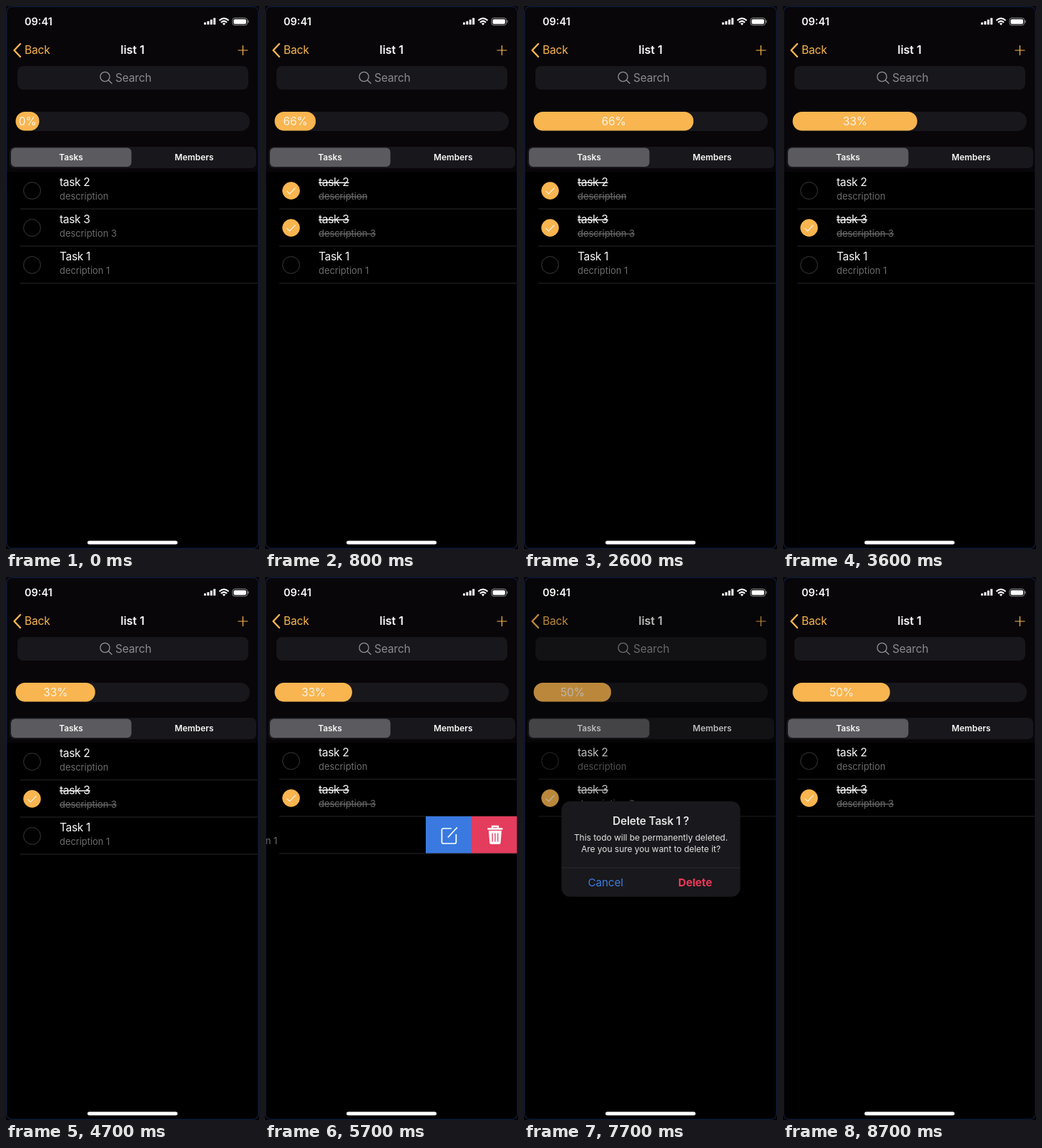
An HTML page for the animation above (8.8 s loop, 354x760 px).

```html
<!DOCTYPE html>
<html lang="en">
<head>
<meta charset="utf-8">
<title>Task list</title>
<style>
  html, body { margin: 0; width: 100%; height: 100%; overflow: hidden; background: #000; }
  svg { display: block; width: 354px; height: 760px; font-family: Inter, sans-serif; }
  text { fill: #f8f8f8; }
  .mid { text-anchor: middle; }
  .accent { fill: #f9b54f; }
  .line { fill: none; stroke: #f9b54f; }
  .field { fill: #18171b; }
  .bold { font-weight: 600; }
  .title { font-size: 15.6px; letter-spacing: -.35px; }
  .note { font-size: 12.9px; fill: #6c6c6e; }
  .done text { text-decoration: line-through; }
  .ring { fill: none; stroke: #3a3a3c; }
  .done .ring { fill: #f9b54f; stroke: #f9b54f; stroke-width: .8; }
  .tick { fill: none; stroke: #fff; stroke-width: 1.1; stroke-opacity: .85; visibility: hidden; }
  .done .tick { visibility: visible; }
  .rule { stroke: #29292b; }
</style>
</head>
<body>
<svg viewBox="0 0 354 760">
  <rect width="354" height="760" fill="#000"/>
  <rect width="354" height="232" fill="#080609"/>

  <path class="line" d="M20 53L11.5 62L20 71" stroke-width="2.4" stroke-linecap="round" stroke-linejoin="round"/>
  <text class="accent" x="26" y="67.3" font-size="15.6" letter-spacing="-.2">Back</text>
  <text class="mid bold" x="177" y="67.3" font-size="16.2" letter-spacing="-.1">list 1</text>
  <path class="line" d="M324.5 62H338.5M331.5 55V69" stroke-width="1.2"/>

  <rect class="field" x="16" y="84" width="323" height="33" rx="8"/>
  <g fill="none" stroke="#929196" stroke-width="1.3" stroke-linecap="round">
    <circle cx="138.5" cy="99" r="6.6"/><path d="M143.3 103.8L148 108.3"/>
  </g>
  <text x="153" y="106" font-size="15.4" letter-spacing="-.1" style="fill:#8b8a8f">Search</text>

  <rect class="field" x="14" y="148" width="327" height="27" rx="13"/>
  <rect id="bar" class="accent" x="13.5" y="148" height="26.5" rx="13"/>
  <text id="percent" class="mid" y="167.3" font-size="15.5" letter-spacing="-.1" fill-opacity=".92"></text>

  <rect class="field" x="5" y="197" width="345" height="30" rx="7"/>
  <rect x="7" y="198.5" width="168.5" height="26.5" rx="6" fill="#5b5a5e"/>
  <g class="mid bold" font-size="11.9">
    <text x="91" y="215.7">Tasks</text><text x="263.3" y="215.7">Members</text>
  </g>

  <g id="list"></g>

  <rect id="dim" width="354" height="760" fill="#000"/>
  <g id="alert" class="mid">
    <rect x="-125" y="-67" width="250" height="133.5" rx="12" fill="#19181c"/>
    <text class="bold" y="-34.3" font-size="15.4" letter-spacing="-.15" fill-opacity=".9">Delete Task 1 ?</text>
    <g font-size="11.95" fill-opacity=".9">
      <text y="-12.3">This todo will be permanently deleted.</text>
      <text y="3.7">Are you sure you want to delete it?</text>
    </g>
    <path d="M-125 26H125" stroke="#2b2a2f"/>
    <text x="-63.3" y="52" font-size="15.1" style="fill:#3b7fe4">Cancel</text>
    <text x="62" y="52" font-size="15.2" font-weight="700" style="fill:#ec3958">Delete</text>
  </g>

  <text class="bold" x="26" y="27" font-size="14.5">09:41</text>
  <path d="M278.5 26V23M282.9 26V21.3M287.3 26V19M291.7 26V16.8" stroke="#fff" stroke-width="3"/>
  <path d="M298.4 20.2Q305 14.2 311.6 20.2M300.9 23Q305 19.2 309.1 23" fill="none" stroke="#fff" stroke-width="2"/>
  <path d="M302.8 24.6Q305 22.8 307.2 24.6L305 27Z" fill="#fff"/>
  <rect x="317" y="16.8" width="20.6" height="10" rx="3" fill="none" stroke="#8c8c8c"/>
  <rect x="318.6" y="18.4" width="17.4" height="6.8" rx="1.6" fill="#fff"/>
  <path d="M339 20V23.6" stroke="#8c8c8c" stroke-width="1.3"/>
  <rect x="114" y="748.5" width="126" height="5" rx="2.5" fill="#fff"/>
  <rect x=".75" y=".75" width="352.5" height="758.5" rx="8" fill="none" stroke="#0f1a36" stroke-width="1.5"/>
</svg>

<script>
const LOOP = 8800, STEP = 100, BAR_TIME = 2000;
const OPEN = 5300, DELETED = 7700;
const BAR_FULL = 327, BAR_MIN = 32.5;

// Each tap toggles a row; the bar then heads for the new share.
const changes = [
  { at: 300, row: 0, percent: 33 },
  { at: 680, row: 1, percent: 66 },
  { at: 1080, row: 2, percent: 100 },
  { at: 2250, row: 2, percent: 66 },
  { at: 2750, row: 0, percent: 33 },
  { at: DELETED, percent: 50 }
];
const tasks = [
  ['task 2', 'description'],
  ['task 3', 'description 3'],
  ['Task 1', 'decription 1']
];

const el = id => document.getElementById(id);
const ramp = (t, from, to) => Math.min(1, Math.max(0, (t - from) / (to - from)));

el('list').innerHTML = tasks.map(([title, note], i) => `
  <g class="row" transform="translate(0 ${232 + 52 * i})">
    <g class="content">
      <circle class="ring" cx="36.5" cy="26.5" r="11.9"/>
      <path class="tick" d="M30.5 27.2L34.5 31L42.5 22.5"/>
      <text class="title" x="75" y="20.3">${title}</text>
      <text class="note" x="75" y="39">${note}</text>
    </g>
    ${i === 2 ? `<g class="actions">
      <rect class="edit" width="67" height="52" fill="#3a7ae0"/>
      <rect class="bin" width="67" height="52" fill="#e43c5c"/>
      <g class="edit" fill="none" stroke="#fff" stroke-width="1.7">
        <path d="M36 17H24.5Q22.5 17 22.5 19V36Q22.5 38 24.5 38H40.5Q42.5 38 42.5 36V25M31 29.5L44 15.5"/>
      </g>
      <g class="bin">
        <path d="M23 17.5H44M29.5 16.5V14H37.5V16.5" fill="none" stroke="#fff" stroke-width="2.4"/>
        <path d="M24.5 20H42.5L41.2 37Q41 39 39 39H28Q26 39 25.8 37Z" fill="#fff"/>
        <path d="M29.7 23.5V35.5M33.5 23.5V35.5M37.3 23.5V35.5" stroke="#e43c5c" stroke-width="1.3"/>
      </g>
    </g>` : ''}
    <path class="rule" d="M20 52H352"/>
  </g>`).join('');

const rows = [...document.querySelectorAll('.row')];
const swiped = rows[2].querySelector('.content');

function progress(t) {
  let from = BAR_MIN, target = BAR_MIN, start = 0, percent = 0;
  const widthAt = time => from + (target - from) * ramp(time, start, start + BAR_TIME);
  for (const change of changes) {
    if (change.at > t) break;
    from = widthAt(change.at);
    target = BAR_FULL * change.percent / 100;
    start = change.at;
    percent = change.percent;
  }
  return { width: widthAt(t), percent };
}

function render(t) {
  const { width, percent } = progress(t);
  el('bar').setAttribute('width', width + .5);
  el('percent').setAttribute('x', 14 + width / 2);
  el('percent').textContent = percent + '%';

  rows.forEach((row, i) => {
    const taps = changes.filter(c => c.row === i && c.at <= t).length;
    row.classList.toggle('done', taps % 2 === 1);
  });
  el('list').setAttribute('transform', `translate(0 ${t < OPEN ? 0 : -1})`);
  rows[2].style.display = t < DELETED ? '' : 'none';

  const open = 1 - (1 - ramp(t, OPEN, OPEN + 600)) ** 3;
  swiped.setAttribute('transform', `translate(${-133 * open} 0)`);
  const place = (name, x) => rows[2].querySelectorAll(name)
    .forEach(node => node.setAttribute('transform', `translate(${x} 0)`));
  place('.edit', 353 - 133 * open);
  place('.bin', 353 - 67 * open);
  rows[2].querySelector('.actions').style.visibility = open ? 'visible' : 'hidden';

  const shown = ramp(t, 6550, 6850);
  const fade = shown * (1 - ramp(t, DELETED, DELETED + 300));
  el('dim').setAttribute('opacity', .25 * fade);
  el('alert').setAttribute('opacity', shown < 1 ? shown * .9 : fade);
  el('alert').setAttribute('transform', `translate(177.5 381) scale(${1.15 - .15 * shown})`);
}

const origin = performance.now();
function tick() {
  const t = (performance.now() - origin) % LOOP;
  render(Math.floor(t / STEP) * STEP);
  requestAnimationFrame(tick);
}
tick();
</script>
</body>
</html>
```
